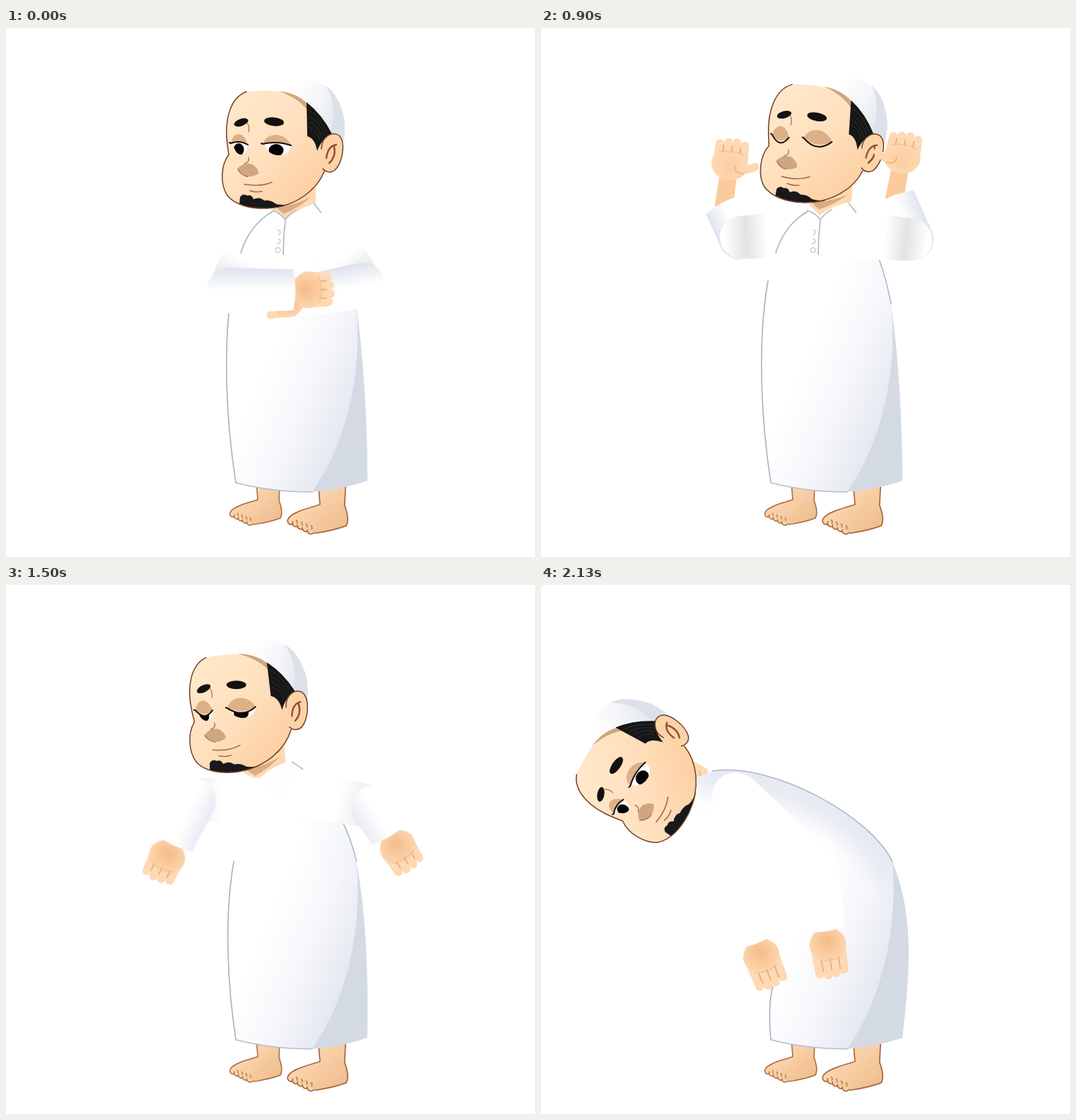
Recreate the animation shown at these times as an HTML page with a canvas. Size 748 by 748 pixels, loop 4200 ms.

```html
<!DOCTYPE html>
<html lang="en">
<head>
<meta charset="utf-8">
<style>
html, body { margin: 0; width: 100%; height: 100%; overflow: hidden; background: #fff; }
canvas { display: block; width: 100vw; height: 100vh; }
</style>
</head>
<body>
<canvas id="stage" width="748" height="748"></canvas>
<script>
const ctx = document.getElementById('stage').getContext('2d');
const LOOP = 4200, STEP = 30, END = 2130;
const OUTLINE = '#70402a', KNUCKLE = '#e3a876';

const mix = (a, b, k) => a + (b - a) * k;
const mixPoint = (p, q, k) => [mix(p[0], q[0], k), mix(p[1], q[1], k)];
const ramp = (t, from, to) => Math.min(1, Math.max(0, (t - from) / (to - from)));
const gray = n => `rgb(${n},${n},${n})`;

function paint(path, fill, stroke, width = 1.5) {
  const p = typeof path === 'string' ? new Path2D(path) : path;
  if (fill) { ctx.fillStyle = fill; ctx.fill(p); }
  if (stroke) { ctx.strokeStyle = stroke; ctx.lineWidth = width; ctx.stroke(p); }
}

function oval(x, y, rx, ry, fill, turn = 0, stroke, width) {
  const p = new Path2D();
  p.ellipse(x, y, rx, ry, turn, 0, 7);
  paint(p, fill, stroke, width);
}

function linear([x0, y0], [x1, y1], ...stops) {
  const g = ctx.createLinearGradient(x0, y0, x1, y1);
  stops.forEach((c, i) => g.addColorStop(i / (stops.length - 1), c));
  return g;
}

function placed(x, y, turn, scale, draw) {
  ctx.save();
  ctx.translate(x, y);
  ctx.rotate(turn);
  ctx.scale(scale, scale);
  draw();
  ctx.restore();
}

// Key poses: elbow and hand of each arm. Everything else on an arm follows from them.
const poses = [
  { at: 60,   left: [[316, 371], [432, 370]], right: [[504, 364], [394, 384]] },
  { at: 240,  left: [[295, 330], [291, 258]], right: [[515, 318], [392, 265]] },
  { at: 510,  left: [[286, 298], [266, 194]], right: [[522, 302], [501, 182]] },
  { at: 1260, left: [[280, 294], [269, 183]], right: [[524, 297], [521, 176]] },
  { at: 1500, left: [[265, 305], [226, 388]], right: [[520, 315], [556, 374]] },
  { at: END,  left: [[275, 430], [313, 528]], right: [[388, 400], [406, 512]] }];

function armPose(t, name, side) {
  let i = 0;
  while (i < poses.length - 2 && t > poses[i + 1].at) i++;
  const from = poses[i], to = poses[i + 1];
  let k = ramp(t, from.at, to.at);
  if (to.at === END) k = 1 - (1 - k) ** 2.4;
  const [elbow, hand] = from[name].map((p, j) => mixPoint(p, to[name][j], k));
  hand[0] += side * 50 * Math.sin(Math.PI * ramp(t, 1260, 1500));
  return { elbow, hand };
}

// Tapered tube with a round end at a and a flat end at b.
function tube(a, b, ra, rb) {
  const angle = Math.atan2(b[1] - a[1], b[0] - a[0]);
  const nx = -Math.sin(angle), ny = Math.cos(angle);
  const p = new Path2D();
  p.arc(a[0], a[1], ra, angle + Math.PI / 2, angle - Math.PI / 2);
  p.lineTo(b[0] - nx * rb, b[1] - ny * rb);
  p.quadraticCurveTo(b[0] + ny * 7, b[1] - nx * 7, b[0] + nx * rb, b[1] + ny * rb);
  p.closePath();
  return p;
}

function drawHand(side, reach, open) {
  const skin = ctx.createRadialGradient(0, 10, 2, 0, 5, 30);
  skin.addColorStop(0, open > .5 ? '#fccfa5' : '#f4bd8a');
  skin.addColorStop(1, '#ffd9b3');
  const wrist = mix(21, 12, open);
  paint(`M${-wrist} 12 L-13 ${30 + 36 * open} L13 ${30 + 36 * open} L${wrist} 12Z`, '#fbcb9d');
  paint(`M${side * 14} 10 Q${side * 25} 11 ${side * (17 + 19 * open)} 3`, null, '#ffd6ae', 11);
  for (let i = 0; i < 4; i++) {
    const x = (i - 1.5) * 12.6, tip = -reach + 6 + 3 * Math.abs(i - 1.7);
    paint(`M${x} 0 L${x * .93} ${tip}`, null, '#ffd9b3', 12);
  }
  oval(0, 4, 26, 23, skin);
  for (const x of [-12.6, 0, 12.6])
    paint(`M${x} ${-reach * .36} L${x * .95} ${-reach + 13}`, null, KNUCKLE, 1.5);
  paint(`M-18 ${-reach * .32} Q0 ${-reach * .5} 18 ${-reach * .32}`, null, '#f0bd8f', 1);
  if (open > .5) paint(`M${side * 22} 15 Q${side * 6} 16 ${side * 8} 6`, null, KNUCKLE, 1.3);
}

function drawArm(t, name, side, shoulder, bow, open) {
  const { elbow, hand } = armPose(t, name, side);
  const turn = Math.atan2(hand[0] - elbow[0], elbow[1] - hand[1]) + open * .28;
  const grip = 26 + 36 * open;
  const cuff = [hand[0] - Math.sin(turn) * grip, hand[1] + Math.cos(turn) * grip];
  const soft = 1 - ramp(bow, 0, .5);

  const upper = () => {
    const tip = mixPoint(shoulder, elbow, 1.35);
    const dark = gray(Math.round(255 - 28 * soft));
    paint(tube(elbow, shoulder, 30, 34), linear(tip, shoulder, '#fff', dark, '#fff', '#fff'));
    oval(...shoulder, 33, 33, '#fff');
  };
  const fore = () => {
    const angle = Math.atan2(cuff[1] - elbow[1], cuff[0] - elbow[0]);
    const edge = [elbow[0] - side * Math.sin(angle) * 32, elbow[1] + side * Math.cos(angle) * 32];
    const tint = `rgb(${[34, 29, 18].map(d => Math.round(255 - d * soft))})`;
    paint(tube(elbow, cuff, 32, 29), linear(edge, elbow, tint, '#fff'));
  };

  placed(...hand, turn, 1, () => drawHand(-side, mix(34, 46, bow), open));
  (open > .6 ? [fore, upper] : [upper, fore]).forEach(draw => draw());
}

function drawFoot() {
  const skin = linear([330, 650], [380, 705], '#ffdcb6', '#eebc8d');
  for (let i = 0; i < 5; i++) oval(321 + i * 6, 687 + i * 2.9, 4.5, 4.5, '#fdd3a6', 0, '#a9683f');
  const front = 'M353 630 L356 667 C341 672 326 675 318 683';
  const heel = 'Q372 699 388 693 C392 686 389 676 386 668 L388 630';
  paint(`${front} Q328 694 350 701 ${heel}Z`, skin);
  paint(`${front} M350 702 ${heel}`, null, '#a9683f');
  for (let i = 0; i < 4; i++) paint(`M${327 + i * 6} ${686 + i * 2.3} q2 1 1 4`, null, '#b97b50', 1.3);
}

function drawRobe(bow) {
  const at = (x0, y0, x1, y1) => `${mix(x0, x1, bow)} ${mix(y0, y1, bow)} `;
  const waist = at(495, 390, 497, 392);
  const back = `M${at(435, 248, 243, 263)} C${at(455, 270, 330, 250)} ${at(482, 320, 470, 330)} ${waist}`;
  const skirt = `C${at(506, 470, 530, 470)} ${at(511, 560, 520, 560)} 511 640`;
  const front = `C${at(312, 560, 322, 610)} ${at(305, 450, 323, 585)} ${at(321, 357, 328, 567)}`;
  const collar = `L${at(376, 260, 205, 345)} L${at(395, 271, 220, 272)}Z`;
  const shape = new Path2D(`${back} ${skirt} Q425 670 325 643 ${front} ${collar}`);

  paint(shape, linear([370, 470], [500, 525], '#fff', '#f6f7fb', '#e3e7ef'));
  ctx.save();
  ctx.clip(shape);
  ctx.globalAlpha = bow;
  ctx.filter = 'blur(14px)';
  paint(back, null, '#e7eaf2', 66);
  ctx.restore();
  paint(`M${waist} ${skirt} Q475 653 433 656 C480 590 505 490 ${waist}`, '#d4dae3');
  paint(back, null, '#adb6ca', 1.6);
  paint(`M325 643 ${front}`, null, '#a7b0c4', 1.6);
  paint('M325 643 Q375 656 433 656', null, '#b5bdcd', 1.6);
}

function drawPlacket(alpha) {
  ctx.save();
  ctx.globalAlpha = alpha;
  paint('M332 318 Q344 279 376 260 L377 258 Q388 262 395 271 Q401 262 411 257 M395 271 Q392 296 392 320', null, '#b6b9cd', 1.8);
  for (let i = 0; i < 3; i++) oval(384.5, 289 + i * 12.5, 3.3, 3.3, '#fff', 0, '#c3c5cc', 1.2);
  ctx.restore();
}

function drawEye(x, y, w, pupil, open) {
  const lash = `Q${x} ${y + mix(20, -5, open)} ${x + w} ${y + 2}`;
  if (open > .1) {
    const white = new Path2D(`M${x - w} ${y} ${lash} C${x + w - 2} ${y + 21} ${x - w + 6} ${y + 21} ${x - w + 3} ${y}Z`);
    paint(white, '#fff');
    ctx.save();
    ctx.clip(white);
    oval(x - 1, y + 9, pupil, 9, '#050505');
    ctx.restore();
  }
  paint(`M${x - w} ${y} C${x - w * .7} ${y - 18} ${x + w * .6} ${y - 17} ${x + w} ${y + 2} Q${x} ${y + mix(14, -5, open)} ${x - w} ${y}`, '#dcb188');
  paint(`M${x - w - 2} ${y - 1} L${x - w} ${y} ${lash}`, null, '#15100e', 2);
}

function drawNeck() {
  paint('M380 245 L438 225 L438 248 Q410 256 395 271 L378 257Z', '#ffd9b0');
  paint('M382 254 Q412 250 432 238 Q416 253 393 263Z', '#d8ad83');
}

function drawHead(open) {
  paint('M340 90 Q380 72 432 74 C462 78 482 115 479 148 Q479 160 473 172 L460 150 Q425 100 385 90Z',
    linear([405, 85], [475, 130], '#fff', '#f4f5f9', '#e2e6ee'));
  paint('M452 82 C466 105 464 130 458 146 L473 172 Q480 155 479 135 Q473 95 452 82Z', '#dce1e9');

  const face = 'M340 90 C318 98 308 128 313 165 L315 179 C303 195 303 222 313 237 C324 250 345 256 370 255 C412 252 440 228 450 203';
  paint(`${face} L462 152 Q438 112 412 97 Q385 85 340 90Z`,
    linear([325, 110], [440, 225], '#ffe7ca', '#ffe0bd', '#fdcfa2'));
  paint('M331 239 Q335 233 341 237 Q347 235 350 242 Q359 238 365 244 Q375 243 382 249 Q391 251 402 249 Q386 255 366 255 Q343 255 330 249Z', '#17181a');
  paint(face, null, OUTLINE);
  paint('M385 89 Q412 92 426 107 L426 116 Q412 98 385 89Z', '#cfa67e');

  paint('M425 105 Q447 122 461 150 Q447 155 440 174 Q437 156 426 153Z', '#161616');
  for (let i = 0; i < 4; i++)
    paint(`M428 ${116 + i * 8} Q443 ${126 + i * 7} ${455 - i * 4} ${149 + i * 3}`, null, '#3a3a3a', .7);

  const ear = 'M446 171 C446 154 461 145 471 152 C481 162 476 190 465 201 C458 206 451 203 448 199';
  paint(ear, '#fdd2a6', OUTLINE);
  paint('M467 165 Q455 167 453 184 M464 168 Q467 182 457 191', null, '#8c5031', 2.4);

  oval(332.5, 133.5, 10.5, 5, '#141110', -.35);
  oval(379, 132.5, 14, 6, '#141110', .1);
  paint('M341 134 Q345 140 343 147', null, '#a87651', 1.3);
  drawEye(330, 163, 12, 7.5, open);
  drawEye(383, 164, 20, 10.5, open);

  paint('M327 199 Q338 188 349 193 Q358 200 357 206 Q347 212 339 209 Q329 206 327 199Z', '#cfa680');
  paint('M343 183 Q345 189 337 192 M328 200 Q333 209 342 210', null, '#9c6d4c', 1.3);
  paint('M337 221 Q360 225 376 218 M345 230 Q353 233 362 231', null, '#a56b49', 1.6);
}

function draw(now) {
  const t = Math.min(END, Math.floor(now % LOOP / STEP) * STEP);
  const lift = ramp(t, 60, 510);
  const bow = ramp(t, 1380, END);
  const open = ramp(t, 100, 510) * (1 - ramp(t, 1260, 1440));
  const eyes = 1 - ramp(t, 570, 900) + ramp(t, 1470, 1680);

  // The head swings about the ear, which travels forward and down.
  const inHead = part => placed(460 + 7 * lift - 281 * bow * (1.3 - .3 * bow), 178 + 29 * bow * bow,
    (5 * lift - 65.5 * bow) * Math.PI / 180, 1, () => { ctx.translate(-460, -178); part(); });

  ctx.fillStyle = '#fff';
  ctx.fillRect(0, 0, 748, 748);
  ctx.lineJoin = ctx.lineCap = 'round';
  drawFoot();
  placed(31, -100, 0, 1.16, drawFoot);
  inHead(drawNeck);
  drawRobe(bow);
  drawPlacket(1 - ramp(t, 1290, 1500));
  inHead(() => drawHead(eyes));
  drawArm(t, 'right', 1, mixPoint([455, 293], [275, 298], bow), bow, open);
  drawArm(t, 'left', -1, mixPoint([352, 292], [245, 350], bow), bow, open);
  // The seam stays readable over the raised sleeve.
  ctx.globalAlpha = 1 - ramp(t, 1290, 1440);
  paint('M332 318 Q344 279 376 260', null, '#b6b9cd', 1.8);
  ctx.globalAlpha = 1;
}

const start = performance.now();
function frame() {
  draw(performance.now() - start);
  requestAnimationFrame(frame);
}
frame();
</script>
</body>
</html>
```
